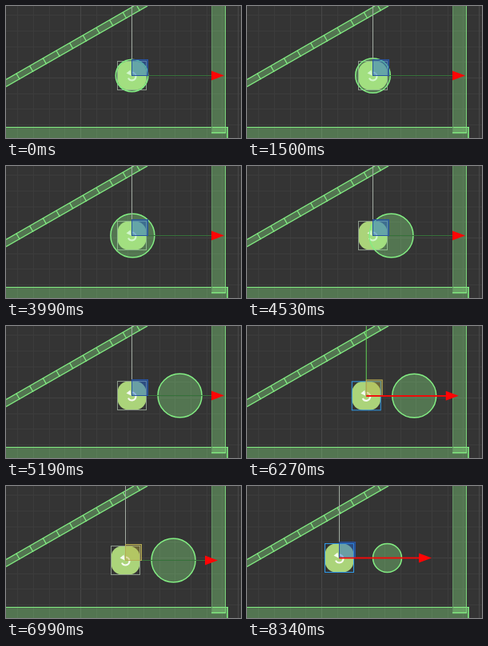
An HTML page with a canvas for the animation above (9450 ms loop, 294 by 166 pixels).

```html
<!DOCTYPE html>
<html lang="en">
<head>
<meta charset="utf-8">
<title>Circle collider</title>
<style>
  html, body { margin: 0; width: 100%; height: 100%; overflow: hidden; background: #343434; }
  canvas { display: block; }
</style>
</head>
<body>
<canvas id="stage" width="294" height="166"></canvas>
<script>
const ctx = document.getElementById('stage').getContext('2d');
const LOOP = 9450, STEP = 30;
const EDGE = '#83ee83', FILL = 'rgba(145,244,139,.34)';

// Each key is [time, value, ...]
const radiusKeys = [[1230, 20.3], [1500, 21.8], [1900, 25.2], [2190, 27], [2340, 27.5]];
const offsetKeys = [[3960, 0], [4200, 7], [4530, 23], [4860, 37.5], [4920, 37.5], [5190, 60]];
const dragKeys = [
  [6210, 157.5, 87.5], [6360, 126, 90], [6510, 98.5, 98.5], [6600, 93.5, 104], [6720, 106, 108.5],
  [6870, 136, 102], [6990, 149.5, 93.5], [7080, 136, 90], [7170, 115.5, 90.5]
];

function track(keys, t, axis = 1, smooth = false) {
  const last = keys.length - 1;
  if (t <= keys[0][0]) return keys[0][axis];
  if (t >= keys[last][0]) return keys[last][axis];
  const i = keys.findIndex(k => k[0] > t) - 1;
  const [a, b] = [keys[i], keys[i + 1]];
  const span = b[0] - a[0], u = (t - a[0]) / span;
  if (!smooth) return a[axis] + (b[axis] - a[axis]) * u;
  const slope = n => n <= 0 || n >= last ? 0 :
    (keys[n + 1][axis] - keys[n - 1][axis]) / (keys[n + 1][0] - keys[n - 1][0]);
  const u2 = u * u, u3 = u2 * u;
  return (2 * u3 - 3 * u2 + 1) * a[axis] + (u3 - 2 * u2 + u) * span * slope(i)
    + (3 * u2 - 2 * u3) * b[axis] + (u3 - u2) * span * slope(i + 1);
}

function line(x1, y1, x2, y2, color, width = 1) {
  ctx.strokeStyle = color;
  ctx.lineWidth = width;
  ctx.beginPath();
  ctx.moveTo(x1, y1);
  ctx.lineTo(x2, y2);
  ctx.stroke();
}

function polygon(points, color) {
  ctx.fillStyle = color;
  ctx.beginPath();
  points.forEach(p => ctx.lineTo(...p));
  ctx.closePath();
  ctx.fill();
}

function box(x, y, w, h, fill, stroke) {
  if (fill) {
    ctx.fillStyle = fill;
    ctx.fillRect(x, y, w, h);
  }
  if (stroke) {
    ctx.strokeStyle = stroke;
    ctx.lineWidth = 1;
    ctx.strokeRect(x, y, w, h);
  }
}

function drawScene() {
  box(0, 0, 294, 166, '#343434');
  for (let n = -5; n <= 10; n++) {
    const x = Math.round(93 + n * 19.7) + .5, y = Math.round(90 + n * 19.7) + .5;
    line(x, 0, x, 166, n % 10 ? '#3c3c3c' : '#484848');
    line(0, y, 294, y, n % 10 ? '#3c3c3c' : '#414141');
  }

  // Sloped beam
  polygon([[0, 92.5], [160, 0], [177, 0], [0, 101.5]], FILL);
  line(0, 92.5, 160, 0, EDGE, 1.3);
  line(0, 101.5, 177, 0, EDGE, 1.3);
  for (let n = 0; n < 11; n++) {
    const x = 15 + n * 16.7, y = 88.5 - n * 9.57;
    line(x - 2.2, y - 3.8, x + 2.2, y + 3.8, EDGE, 1.2);
  }

  // Floor and right wall
  box(0, 152, 277, 14, FILL);
  line(0, 152.5, 278, 152.5, EDGE);
  line(277, 152, 277, 166, EDGE, 1.6);
  box(257, 0, 18, 160, FILL);
  line(257.5, 0, 257.5, 160, '#639463');
  line(274.5, 0, 274.5, 160, '#7cd67c');
  line(257, 159.5, 275, 159.5, EDGE, 1.4);
}

function drawSprite(x, y, outline) {
  ctx.fillStyle = '#abd47a';
  ctx.beginPath();
  ctx.roundRect(x - 18, y - 18, 36, 36, 14);
  ctx.fill();

  ctx.strokeStyle = '#f6faf0';
  ctx.lineWidth = 2.2;
  ctx.beginPath();
  ctx.arc(x, y + 1, 5, -1.7, 2.7);
  ctx.stroke();
  polygon([[x - 7, y - 3], [x - 2, y - 7], [x - 1, y]], '#f6faf0');
  box(x - 18, y - 18, 36, 36, null, outline);
}

function drawCollider(x, y, r) {
  ctx.beginPath();
  ctx.arc(x, y, r, 0, Math.PI * 2);
  ctx.fillStyle = FILL;
  ctx.fill();
  ctx.strokeStyle = EDGE;
  ctx.lineWidth = 1.5;
  ctx.stroke();
  line(x, y, x + r, y, EDGE);
}

function drawGizmo(x, y, bold, hover) {
  line(x, 0, x, y - 20, bold && hover ? '#62d657' : '#a0aaa0');
  line(x, y - 20, x, y, hover ? '#8f9650' : '#2d568f');
  line(x, y, x + 100, y, bold ? '#f50808' : '#36713a', bold ? 1.6 : 1);
  box(x, y - 20, 20, 20,
    hover ? 'rgba(190,175,65,.4)' : 'rgba(35,100,210,.48)',
    hover ? '#b5aa55' : '#2853a0');
  if (bold) line(x, y, x + 100, y, '#f50808', 1.6);
  polygon([[x + 99.5, y - 6], [x + 115.5, y], [x + 99.5, y + 6]], '#ff0505');
}

function render(t) {
  const x = track(dragKeys, t, 1, true), y = track(dragKeys, t, 2, true);
  const radius = t >= 8340 ? 18 : track(radiusKeys, t);
  const hover = t >= 5970 && t < 7200;
  const bold = t >= 6240 && t < 6750 || t >= 7200;

  drawScene();
  drawSprite(x, y, bold ? '#2f9bea' : '#8b998b');
  drawCollider(x + track(offsetKeys, t), y, radius);
  drawGizmo(x, y, bold, hover);
}

const start = performance.now();
function tick() {
  const t = (performance.now() - start) % LOOP;
  render(Math.floor(t / STEP) * STEP);
  requestAnimationFrame(tick);
}
tick();
</script>
</body>
</html>
```
